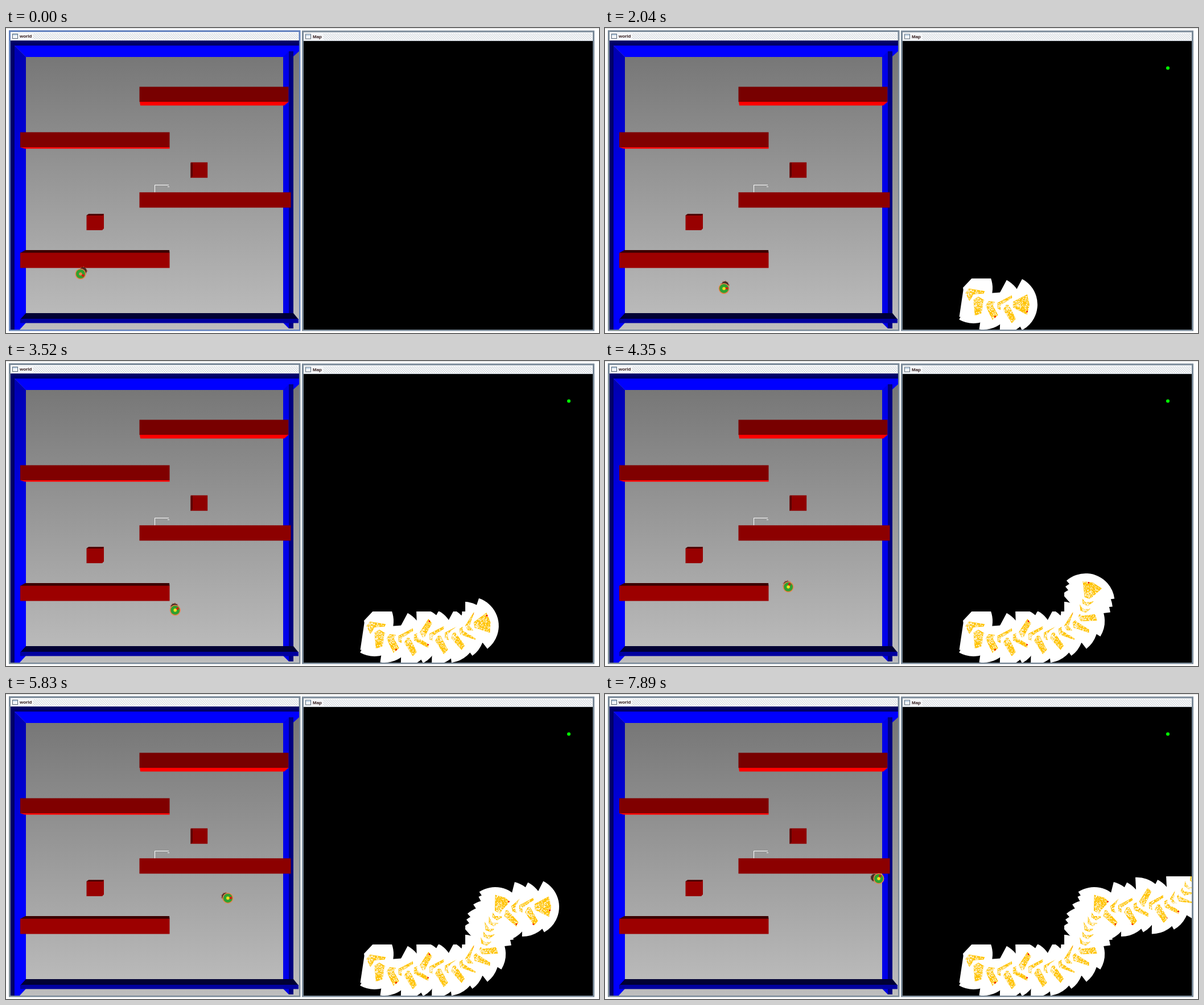
Animation of 1042x537 px, one loop 7.99 s. Source, as an HTML page with a canvas:

```html
<!DOCTYPE html>
<html>
<head>
<meta charset="utf-8">
<style>
html, body { margin: 0; width: 100%; height: 100%; overflow: hidden; background: #fff; }
canvas { display: block; }
</style>
</head>
<body>
<canvas id="stage" width="1042" height="537"></canvas>
<script>
const ctx = document.getElementById('stage').getContext('2d');
const LOOP = 7990, RAD = Math.PI / 180;
const MOVE_START = 910, MOVE_STEP = 93.06;
const SCAN_START = 727, SCAN_STEP = 195;
const SCAN_RADIUS = 51, SCAN_HALF_ANGLE = 62 * RAD;

// Robot route: time, x, y
const route = [
  [910, 131, 433], [1470, 175, 461], [2680, 249, 456], [3240, 282, 449], [3800, 313, 428],
  [4350, 322, 398], [4900, 335, 370], [5350, 360, 362], [6850, 451, 354], [7530, 479, 329],
  [7890, 481, 325]
];

function random(seed) {
  let s = seed * 7919 + 17;
  return () => {
    s = s + 0x6D2B79F5 | 0;
    let r = Math.imul(s ^ s >>> 15, 1 | s);
    r = r + Math.imul(r ^ r >>> 7, 61 | r) ^ r;
    return ((r ^ r >>> 14) >>> 0) / 4294967296;
  };
}

function poseAt(t) {
  const next = route.findIndex((key, i) => i > 0 && key[0] > t);
  const i = (next < 0 ? route.length - 1 : next) - 1;
  const [t1, x1, y1] = route[i], [t2, x2, y2] = route[i + 1];
  const p = Math.min(1, Math.max(0, (t - t1) / (t2 - t1)));
  return {
    x: x1 + (x2 - x1) * p,
    y: y1 + (y2 - y1) * p,
    heading: Math.atan2(y2 - y1, x2 - x1),
    legStart: t1
  };
}

// The robot looks left and right along each leg, less so when driving upward
function scanPose(index) {
  const { x, y, heading, legStart } = poseAt(SCAN_START + index * SCAN_STEP);
  const phase = index - Math.round((legStart - SCAN_START) / SCAN_STEP);
  const swing = 30 * RAD * Math.sin(phase * Math.PI / 2) * Math.cos(heading) ** 2;
  return {
    x: 763.5 + (x - 249) * 1.14,
    y: 28 + (y - 51) * 1.124,
    heading: heading + swing + 4 * RAD
  };
}

function rect(x1, y1, x2, y2, fill) {
  ctx.fillStyle = fill;
  ctx.fillRect(x1, y1, x2 - x1, y2 - y1);
}

function poly(points, fill) {
  ctx.beginPath();
  for (let i = 0; i < points.length; i += 2) ctx.lineTo(points[i], points[i + 1]);
  ctx.closePath();
  ctx.fillStyle = fill;
  ctx.fill();
}

function disc(x, y, r, fill) {
  ctx.beginPath();
  ctx.arc(x, y, r, 0, 7);
  ctx.fillStyle = fill;
  ctx.fill();
}

function shade(y1, y2, from, to) {
  const g = ctx.createLinearGradient(0, y1, 0, y2);
  g.addColorStop(0, from);
  g.addColorStop(1, to);
  return g;
}

function makeBumps() {
  const tile = document.createElement('canvas');
  tile.width = tile.height = 4;
  const c = tile.getContext('2d');
  c.fillStyle = '#bcc2c8';
  c.fillRect(0, 0, 1, 1);
  c.fillRect(2, 2, 1, 1);
  c.fillStyle = '#e0e3e6';
  c.fillRect(1, 1, 1, 1);
  c.fillRect(3, 3, 1, 1);
  return ctx.createPattern(tile, 'repeat');
}
const bumps = makeBumps();

function drawWindow(x1, y1, x2, y2, title, bumpX, border) {
  rect(x1, y1, x2, y2, border);
  rect(x1 + 3, y1 + 3, x2 - 3, y1 + 18, '#f4f6f8');
  rect(bumpX, y1 + 5, x2 - 4, y1 + 17, bumps);
  ctx.strokeStyle = '#5c6a78';
  ctx.lineWidth = 1;
  ctx.strokeRect(x1 + 6.5, y1 + 6.5, 9, 8);
  rect(x1 + 7, y1 + 7, x1 + 15, y1 + 9, '#b8cfe5');
  ctx.fillStyle = '#301818';
  ctx.font = 'bold 8px "Liberation Sans", Arial, sans-serif';
  ctx.fillText(title, x1 + 19, y1 + 13);
}

function drawWorld() {
  rect(8, 22, 515, 531, shade(51, 531, '#777', '#bebebe'));
  // Walls
  poly([15,31, 35,51, 35,519, 24,531, 15,531], shade(51, 360, '#0000b4', '#0000ff'));
  poly([15,31, 515,31, 515,41, 505,50, 487,51, 35,51], '#0000ff');
  rect(8, 22, 15, 531, '#000068');
  rect(8, 22, 515, 31, '#000068');
  poly([487,51, 497,41, 497,529, 487,519], '#0000e8');
  rect(497, 41, 505, 529, '#000080');
  poly([35,502, 505,502, 514,513, 25,513], '#000034');
  rect(25, 512, 514, 519.5, '#0000a0');
  // Obstacles
  rect(234.5, 103.5, 496.5, 130, '#780000');
  poly([235,130, 496.5,130, 489,136.5, 236,136.5], '#ff0000');
  rect(25, 183.5, 287.5, 210, '#800000');
  poly([25,210, 287.5,210, 287.5,212.5, 33,212.5], '#ff0000');
  ctx.strokeStyle = '#fff';
  ctx.lineWidth = 1;
  ctx.beginPath();
  ctx.moveTo(261.5, 290);
  ctx.lineTo(261.5, 276.5);
  ctx.lineTo(286, 276.5);
  ctx.moveTo(284, 279.5);
  ctx.lineTo(287, 279.5);
  ctx.stroke();
  rect(234.5, 289.3, 500.5, 316.3, '#8c0000');
  poly([34,391, 287,391, 287.5,396, 25,396], '#3a0000');
  rect(25, 395.7, 287.5, 422.5, '#9c0000');
  rect(324.5, 236.5, 354.2, 263.7, '#8f0000');
  poly([324.5,238, 328,237, 328,261, 324.5,264], '#5a0000');
  poly([141.5,330, 145,327.5, 172,327.5, 172,353, 169,356, 141.5,356], '#980000');
  poly([141.5,330, 145,327.5, 172,327.5, 170,330], '#400000');
}

function drawRobot({ x, y, heading }, idle) {
  // The base is farther from the camera, so it shifts toward the view centre
  const bx = x + (262 - x) * 0.034, by = y + (277 - y) * 0.034;
  disc(bx, by, 6.5, '#4a2c24');
  ctx.strokeStyle = '#d0603c';
  ctx.lineWidth = 1;
  ctx.setLineDash([2, 3]);
  ctx.beginPath();
  ctx.arc(bx, by, 7.5, 0, 7);
  ctx.stroke();
  ctx.setLineDash([]);
  disc(x, y, 9.5, '#f08048');
  disc(x, y, 8, '#2fa030');
  disc(x + 5 * Math.cos(heading), y + 5 * Math.sin(heading), 2.2, '#e01010');
  disc(x, y, 2.8, idle ? '#f08048' : '#f0e020');
}

// Each scan clears its sector, then scatters fresh samples in front of the robot
function drawScan(index) {
  const { x, y, heading } = scanPose(index), rnd = random(index);
  ctx.save();
  ctx.translate(x, y);
  ctx.rotate(heading);
  ctx.beginPath();
  ctx.moveTo(0, 0);
  ctx.arc(0, 0, SCAN_RADIUS, -SCAN_HALF_ANGLE, SCAN_HALF_ANGLE);
  ctx.fillStyle = '#fff';
  ctx.fill();
  poly([8,-5, 33,-18, 37,0, 33,18, 8,5], '#ffc408');
  ctx.fillStyle = '#fff';
  for (let i = 0; i < 150; i++) {
    const r = 8 + rnd() * 28;
    ctx.fillRect(r, (rnd() - 0.5) * r * 1.1, 1.2, 1.2);
  }
  const side = (rnd() - 0.5) * 60 * RAD;
  disc(35 * Math.cos(side), 35 * Math.sin(side), 1.4, '#f00000');
  ctx.restore();
}

function drawMap(t) {
  rect(523, 23, 1031, 531, '#000');
  if (t < 730) return;
  disc(989, 70.5, 3, '#00ff00');
  ctx.save();
  // Free corridors bounded by the obstacles
  ctx.beginPath();
  ctx.rect(523, 441, 284, 90);
  ctx.rect(807, 321, 224, 210);
  ctx.clip();
  const last = Math.floor((t - SCAN_START) / SCAN_STEP);
  for (let i = 0; i <= last; i++) drawScan(i);
  ctx.restore();
}

function draw(t) {
  const step = Math.floor((t - MOVE_START) / MOVE_STEP + 0.15);
  rect(0, 0, 1042, 537, '#fff');
  rect(0, 0, 1042, 1, '#d8d8d8');
  drawWindow(5, 4, 517.5, 533.5, 'world', 48, t < 630 ? '#6382bf' : '#7a8a99');
  drawWorld();
  drawRobot(poseAt(MOVE_START + step * MOVE_STEP), t < MOVE_START);
  drawWindow(520, 4.5, 1034, 533.5, 'Map', 558, '#7a8a99');
  drawMap(t);
}

const origin = performance.now();
function tick() {
  draw((performance.now() - origin) % LOOP);
  requestAnimationFrame(tick);
}
tick();
</script>
</body>
</html>
```
